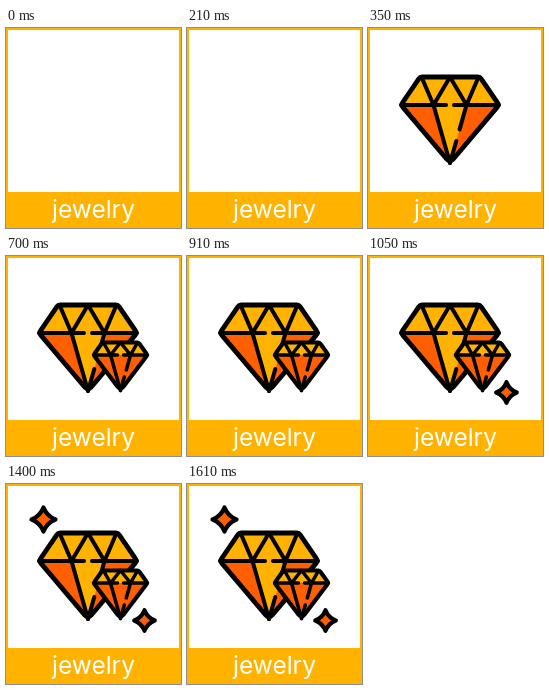
An HTML page with a canvas for the animation above (1.75 s loop, 175 by 200 pixels).

```html
<!DOCTYPE html>
<html lang="en">
<head>
<meta charset="utf-8">
<title>Jewelry icon</title>
<style>
html, body { margin: 0; width: 100%; height: 100%; overflow: hidden; background: #fff; }
canvas { display: block; width: 175px; height: 200px; }
</style>
</head>
<body>
<canvas id="stage"></canvas>
<script>
const STEP = 350, STEPS = 5;
const GOLD = '#ffb300', ORANGE = '#ff5f00', INK = '#000';
const canvas = document.getElementById('stage');
const ctx = canvas.getContext('2d');
const scale = window.devicePixelRatio || 1;
canvas.width = 175 * scale;
canvas.height = 200 * scale;
ctx.scale(scale, scale);
ctx.lineJoin = ctx.lineCap = 'round';

function trace(points) {
  ctx.beginPath();
  points.forEach(([x, y]) => ctx.lineTo(x, y));
}

function fill(color, ...points) {
  trace(points);
  ctx.closePath();
  ctx.fillStyle = color;
  ctx.fill();
}

function line(...points) {
  trace(points);
  ctx.stroke();
}

function mix([ax, ay], [bx, by], t) {
  return [ax + (bx - ax) * t, ay + (by - ay) * t];
}

function roundOutline(points, radius) {
  const n = points.length;
  ctx.beginPath();
  ctx.moveTo(...mix(points[n - 1], points[0], 0.5));
  points.forEach((p, i) => ctx.arcTo(...p, ...points[(i + 1) % n], radius));
  ctx.closePath();
  ctx.stroke();
}

// A cut gem, symmetric about cx; half widths for crown, girdle and inner facets.
function gem({ cx, top, mid, tip, crown, girdle, facet, weight, gap, heart }) {
  const tl = [cx - crown, top], tr = [cx + crown, top], tc = [cx, top];
  const l = [cx - girdle, mid], r = [cx + girdle, mid];
  const fl = [cx - facet, mid], fr = [cx + facet, mid];
  const end = [cx, tip];

  fill(GOLD, tl, tr, r, l);
  fill(ORANGE, l, r, end);
  fill(heart, fl, fr, end);

  ctx.strokeStyle = INK;
  ctx.lineWidth = weight;
  roundOutline([tl, tr, r, end, l], weight * 0.85);

  ctx.lineWidth = weight * 0.84;
  line(mix(tl, tc, 0.05), fl, tc, fr, mix(tr, tc, 0.05));
  line(l, [cx - gap, mid]);
  line([cx + gap, mid], r);
  line(fl, end);
  line(fr, mix(fr, end, 0.42));
  line(mix(fr, end, 0.62), end);
}

function star(cx, cy, radius) {
  const waist = radius * 0.4;
  ctx.beginPath();
  ctx.moveTo(cx, cy - radius);
  for (let i = 0; i < 4; i++) {
    const a = i * Math.PI / 2, b = a - Math.PI / 4;
    ctx.quadraticCurveTo(
      cx + waist * Math.cos(b), cy + waist * Math.sin(b),
      cx + radius * Math.cos(a), cy + radius * Math.sin(a));
  }
  ctx.closePath();
  ctx.fillStyle = ORANGE;
  ctx.fill();
  ctx.strokeStyle = INK;
  ctx.lineWidth = 4.2;
  ctx.stroke();
}

function card() {
  ctx.fillStyle = GOLD;
  ctx.fillRect(0, 0, 175, 200);
  ctx.fillStyle = '#fff';
  ctx.fillRect(2, 2, 171, 162);
  ctx.font = '24.5px Inter, Lato, sans-serif';
  ctx.textAlign = 'center';
  ctx.fillText('jewelry', 87.5, 189.5);
}

const parts = [
  () => gem({ cx: 82, top: 49, mid: 77, tip: 135, crown: 30, girdle: 49,
              facet: 16.5, weight: 4.8, gap: 4, heart: GOLD }),
  () => gem({ cx: 114.5, top: 86.5, mid: 99, tip: 134.5, crown: 18, girdle: 27,
              facet: 10, weight: 4.2, gap: 3, heart: ORANGE }),
  () => star(138.5, 136.5, 10.3),
  () => star(37.5, 35.5, 12)
];

function draw(now) {
  const step = Math.floor(now / STEP) % STEPS;
  card();
  parts.slice(0, step).forEach(part => part());
}

const start = performance.now();
function tick() {
  draw(performance.now() - start);
  requestAnimationFrame(tick);
}
tick();
</script>
</body>
</html>
```
